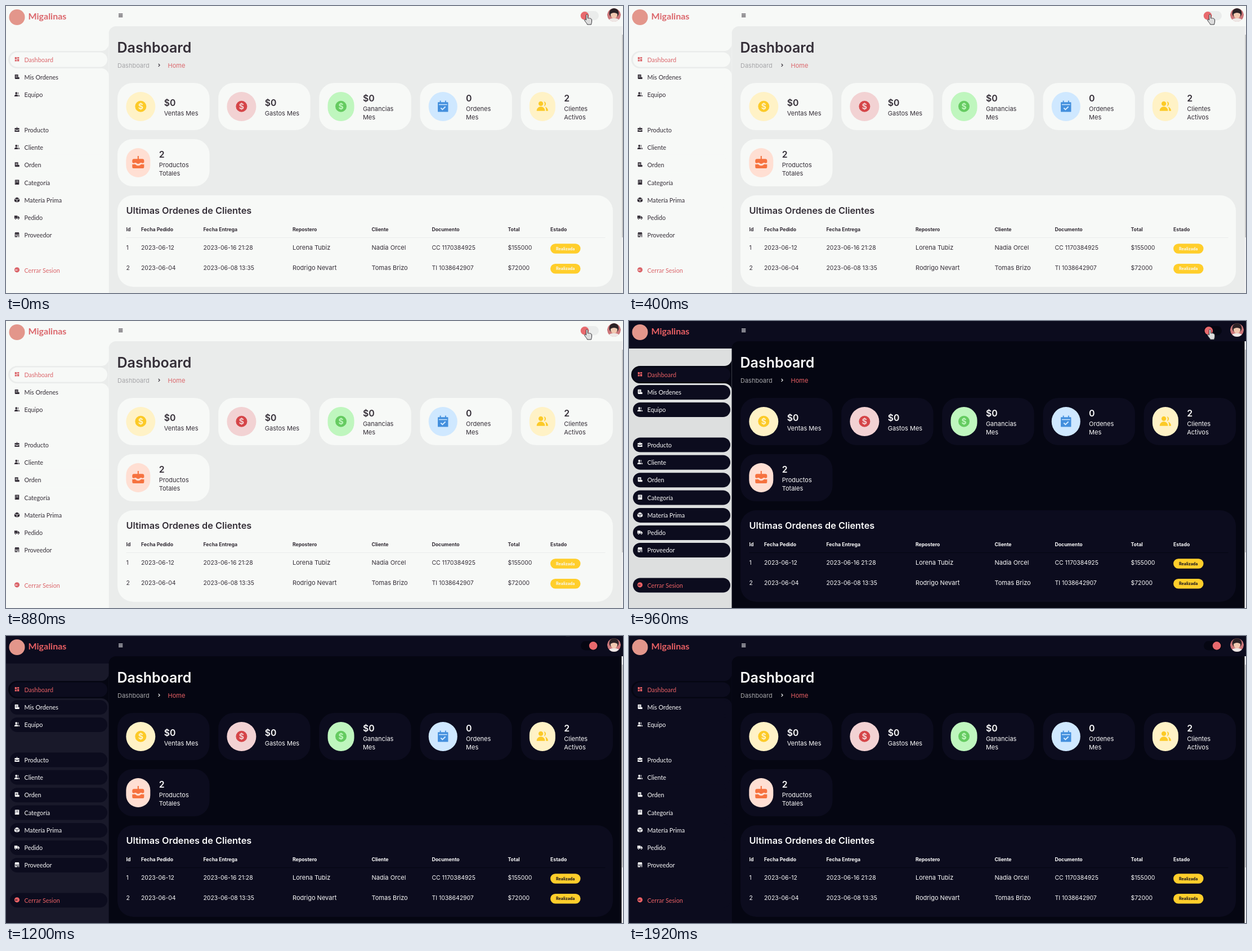
Recreate the animation shown at these times as an HTML page. Size 1096 px wide and 511 px high, loop 2000 ms.

```html
<!DOCTYPE html>
<html lang="es">
<head>
<meta charset="utf-8">
<title>Dashboard</title>
<style>
html, body { margin: 0; width: 100%; height: 100%; overflow: hidden; }
svg {
  display: block; font: 11px Inter, sans-serif;
  --light: #f7f9f7; --grey: #eaeceb; --ink: #342e37; --red: #db666b; --badge: #f7f9f7;
}
svg.dark {
  --light: #0c0c1e; --grey: #050612; --ink: #fbfbfb; --red: #e96064; --badge: #0c0c1e;
}
.light { fill: var(--light); }
.grey { fill: var(--grey); }
.ink { fill: var(--ink); }
.red { fill: var(--red); }
.menu { font: 10.8px Lato, sans-serif; }
.brand { font: 700 16px Lato, sans-serif; }
.h1 { font-size: 25px; font-weight: 600; }
.h2 { font-size: 16.3px; font-weight: 600; }
.value { font-size: 15.8px; font-weight: 600; }
.th { font-size: 8.7px; font-weight: 700; }
.num { font-size: 10.4px; }
.badge { font-size: 7px; font-weight: 700; text-anchor: middle; fill: var(--badge); }
.coin { font-size: 14px; font-weight: 700; text-anchor: middle; }
</style>
</head>
<body>
<svg id="stage" width="1096" height="511" viewBox="0 0 1096 511"></svg>
<script>
const LOOP = 2000, STEP = 80, SWITCH = 960;
const stage = document.getElementById('stage');

// Icons on a 24-unit grid
const icons = {
  dash: 'M3 3h8v9H3zM13 3h8v6h-8zM13 11h8v10h-8zM3 14h8v7H3z',
  note: 'M3 2h14v11h5v8H6a3 3 0 0 1-3-3zM6 6v2h8V6zM6 11v2h8v-2z',
  people: 'M9 11.500a4.500 4.500 0 1 0 0-9 4.500 4.500 0 0 0 0 9zM1 21c0-11 16-11 16 0zM15 3c5 0 5 8 0 9 2-3 2-6 0-9zM17 13c4 1 6 4 6 8h-4c0-3 0-6-2-8z',
  cake: 'M11 1h2v5h6a3 3 0 0 1 3 3v3c-3 3-4-1-7 1-2 2-4 2-6 0-3-2-4 2-7-1V9a3 3 0 0 1 3-3h6zM2 15c3 1 4-1 6 1 3 2 5 2 8 0 2-2 3 0 6-1v5a2 2 0 0 1-2 2H4a2 2 0 0 1-2-2z',
  book: 'M5 2h16v20H5a2 2 0 0 1-2-2V4a2 2 0 0 1 2-2zM9 6v2h8V6zM9 10v2h8v-2zM5 4v14h1V4z',
  box: 'M12 1l10 5-10 5-10-5zM1 8l10 5v10l-10-5zM23 8l-10 5v10l10-5z',
  truck: 'M1 5h13v12H1zM15 8h4l4 5v4h-8zM6 15a3 3 0 1 0 0 6 3 3 0 0 0 0-6zM18 15a3 3 0 1 0 0 6 3 3 0 0 0 0-6z',
  store: 'M4 2h16l2 8H2zM3 11h18v11H3zM6 13v5h5v-5zM14 13v9h4v-9z',
  exit: 'M12 1a11 11 0 1 0 0 22 11 11 0 0 0 0-22zM4 11h10v3H4z',
  calendar: 'M6 1h2v3h8V1h2v3h3a1 1 0 0 1 1 1v17a1 1 0 0 1-1 1H3a1 1 0 0 1-1-1V5a1 1 0 0 1 1-1h3zM4 8v1.500h16V8zM11 20l-4-4 1.500-1.500 2.500 2.500 5-5 1.500 1.500z'
};

const text = (x, y, s, cls = 'ink', extra = '') =>
  `<text x="${x}" y="${y}" class="${cls}" ${extra}>${s}</text>`;
const rect = (x, y, w, h, r, attrs) =>
  `<rect x="${x}" y="${y}" width="${w}" height="${h}" rx="${r}" ${attrs}/>`;
const circle = (x, y, r, attrs) => `<circle cx="${x}" cy="${y}" r="${r}" ${attrs}/>`;
const path = (d, attrs) => `<path d="${d}" ${attrs}/>`;
const icon = (name, x, y, scale, attrs) =>
  path(icons[name], `transform="translate(${x} ${y}) scale(${scale}) translate(-12 -12)" fill-rule="evenodd" ${attrs}`);

function menu() {
  const rows = [
    [95.5, 'dash', 'Dashboard'], [127, 'note', 'Mis Ordenes'], [158, 'people', 'Equipo'],
    [220.5, 'cake', 'Producto'], [251.8, 'people', 'Cliente'], [283.2, 'note', 'Orden'],
    [314.5, 'book', 'Categoría'], [345.9, 'box', 'Matería Prima'], [377, 'truck', 'Pedido'],
    [408, 'store', 'Proveedor'], [470.5, 'exit', 'Cerrar Sesion']
  ];
  return rows.map(([y, name, label], i) => {
    const cls = i === 0 || i === 10 ? 'red' : 'ink';
    return rect(7, y - 13, 173, 26, 13, 'class="light"') +
      icon(name, 19.5, y - .7, .42, `class="${cls}"`) +
      text(32.5, y + 4, label, 'menu ' + cls);
  }).join('');
}

function cards() {
  const list = [
    [198, 137, 52, '#fff2c6', '#fcca27', 'coin', '$0', ['Ventas Mes']],
    [377.1, 137, 52, '#f2d2d3', '#d54548', 'coin', '$0', ['Gastos Mes']],
    [556.2, 137, 47, '#bff6be', '#65cb60', 'coin', '$0', ['Ganancias', 'Mes']],
    [735.4, 137, 51, '#cfe8ff', '#438fdd', 'calendar', '0', ['Ordenes', 'Mes']],
    [914.5, 137, 46, '#fff2c6', '#fcca27', 'people', '2', ['Clientes', 'Activos']],
    [198, 237, 43, '#ffdfd3', '#f6723f', 'cake', '2', ['Productos', 'Totales']]
  ];
  return list.map(([x, y, w, tint, color, kind, value, labels]) => {
    const cx = x + 15.3 + w / 2, cy = y + 42, tx = x + w + 30.7;
    const top = y + (labels.length > 1 ? 33.3 : 41);
    const glyph = kind === 'coin'
      ? circle(cx, cy - .3, 10, `fill="${color}"`) + text(cx, cy + 4.7, '$', 'coin', `fill="${tint}"`)
      : icon(kind, cx, cy - .5, kind === 'cake' ? 1.05 : .92, `fill="${color}"`);
    return rect(x, y, 163.5, 84, 27, 'class="light"') +
      rect(x + 15.3, y + 16, w, 52, w / 2, `fill="${tint}"`) + glyph +
      text(tx, top, value, 'value ink') +
      labels.map((s, i) => text(tx, top + 17 + i * 14.5, s)).join('');
  }).join('');
}

function table() {
  const columns = [213.5, 240, 350.5, 509, 649.5, 756.5, 891.5, 967];
  const heads = ['Id', 'Fecha Pedido', 'Fecha Entrega', 'Repostero', 'Cliente', 'Documento', 'Total', 'Estado'];
  const rows = [
    ['1', '2023-06-12', '2023-06-16 21:28', 'Lorena Tubiz', 'Nadia Orcel', 'CC 1170384925', '$155000'],
    ['2', '2023-06-04', '2023-06-08 13:35', 'Rodrigo Nevart', 'Tomas Brizo', 'TI 1038642907', '$72000']
  ];
  return rect(198, 337, 880, 163, 28, 'class="light"') +
    text(213.5, 369.7, 'Ultimas Ordenes de Clientes', 'h2 ink') +
    heads.map((s, i) => text(columns[i], 401, s, 'th ink')).join('') +
    rect(213.5, 412, 851, 1, 0, 'class="grey"') +
    rows.map((row, r) => {
      const y = 434.2 + r * 35.8;
      return row.map((s, i) => text(columns[i], y, s, i === 3 || i === 4 ? 'ink' : 'num ink')).join('') +
        rect(967, y - 11, 53.5, 17.5, 8.75, 'fill="#ffce2b"') +
        text(993.7, y + .3, 'Realizada', 'badge');
    }).join('');
}

function avatar() {
  return '<clipPath id="round"><circle cx="1080" cy="16" r="12"/></clipPath><g clip-path="url(#round)">' +
    circle(1080, 16, 12, 'fill="#cc777a"') +
    path('M1069 29c1-10 21-10 22 0z', 'fill="#eee8e6"') +
    circle(1080, 12.5, 8.5, 'fill="#2b2226"') +
    path('M1074 14q6-4 12 0v2a6 6 0 0 1-12 0z', 'fill="#f2c8b0"') + '</g>';
}

stage.innerHTML =
  rect(0, 0, 1096, 511, 0, 'class="light"') +
  path('M182.500 511V49a13 13 0 0 1 13-13H1096V511z', 'class="grey"') +
  rect(0, 49, 182.5, 462, 0, 'id="side"') +
  path('M182.500 67a13 13 0 0 1-13 13H19.500a15.500 15.500 0 0 0 0 31H169.500a13 13 0 0 1 13 13z', 'class="grey"') +
  menu() +
  circle(19.5, 20, 14, 'fill="#e3968b"') +
  text(39.5, 23.6, 'Migalinas', 'brand red') +
  [13.6, 16.1, 18.6].map(y => rect(200, y, 7.3, 1.2, 0, 'class="ink"')).join('') +
  rect(1021, 9, 32, 16.5, 8.25, 'class="grey"') +
  circle(0, 17.4, 7.3, 'id="knob" fill="#e8696d"') +
  avatar() +
  text(197.5, 83, 'Dashboard', 'h1 ink') +
  text(198, 110, 'Dashboard', '', 'fill="#a6a6a9"') +
  path('M270.700 102.800l2.400 2.500-2.400 2.500', 'fill="none" stroke="var(--ink)" stroke-width="1.2"') +
  text(287.5, 110, 'Home', 'red') +
  cards() + table() +
  rect(1093.5, 36, 2.5, 475, 0, 'fill="#f1f1f1"') +
  rect(1094.2, 51, 1.8, 361, 0, 'fill="#c1c1c1"') +
  path('M4 1c1.500 0 2 1 2 2v5c2-1 7 0 7 3v3c0 2-1 3-1 5H5c0-2-4-5-5-8 0-1 1-2 3 0V3c0-1 0-2 1-2z',
    'id="hand" fill="#dcdcdc" stroke="#38383c"');

const side = document.getElementById('side');
const knob = document.getElementById('knob');
const hand = document.getElementById('hand');
const clamp = v => Math.max(0, Math.min(1, v));

// cubic-bezier(.25, .1, .25, 1)
function ease(x) {
  const bezier = (a, b, u) => 3 * a * u * (1 - u) ** 2 + 3 * b * u * u * (1 - u) + u ** 3;
  let lo = 0, hi = 1;
  for (let i = 0; i < 20; i++) {
    const mid = (lo + hi) / 2;
    if (bezier(.25, .25, mid) < x) lo = mid; else hi = mid;
  }
  return bezier(.1, 1, lo);
}

function draw() {
  const t = Math.floor(performance.now() % LOOP / STEP) * STEP;
  const dark = t >= SWITCH;
  const p = dark ? ease(clamp((t - SWITCH + 44) / 400)) : 0;
  const mix = (a, b) => Math.round(a + (b - a) * p);
  stage.classList.toggle('dark', dark);
  side.setAttribute('fill', `rgb(${mix(247, 12)},${mix(249, 12)},${mix(247, 30)})`);
  knob.setAttribute('cx', 1028 + 16 * p);
  const away = clamp((t - 1040) / 160);
  hand.setAttribute('transform', `translate(${1027.5 - 38 * away} ${14 - 33 * away})`);
  hand.setAttribute('visibility', t > 1200 ? 'hidden' : 'visible');
  requestAnimationFrame(draw);
}
draw();
</script>
</body>
</html>
```
